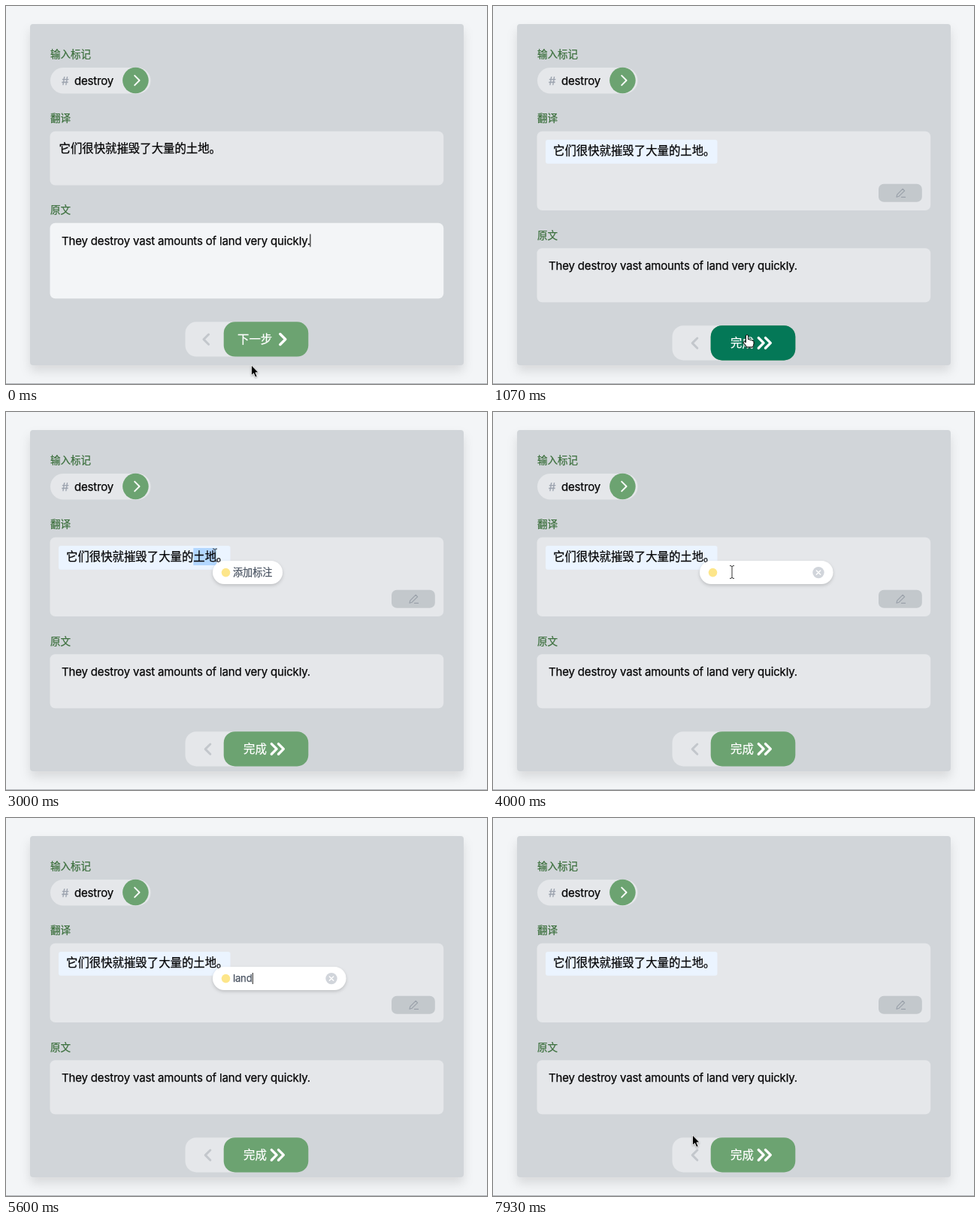
Animation, 640 px wide and 503 px high, one loop 8000 ms. Source, as an HTML page:

```html
<!DOCTYPE html>
<html lang="zh-CN">
<head>
<meta charset="utf-8">
<title>翻译标注</title>
<style>
  html, body { margin: 0; width: 100%; height: 100%; overflow: hidden; background: #f3f5f7; }
  svg { display: block; width: 100%; height: 100%; }
  text {
    font: 15.4px Inter, "Noto Sans CJK SC", sans-serif; white-space: pre;
    color: #050506; fill: currentColor; stroke: currentColor; stroke-width: .25;
  }
  .en { font-size: 15px; letter-spacing: -.17px; }
  .label { font-size: 13.5px; color: #3b6f3c; }
  .white { color: #fff; font-weight: 500; }
  .note { font-size: 13.1px; color: #4b5563; }
  .num { font-size: 11px; color: #8d9096; }
  .on { color: #fff; }
  .box { fill: #e5e7ea; }
  .green { fill: #6ca371; }
  .line { fill: none; stroke: #fff; stroke-linecap: round; stroke-linejoin: round; }
  .back { stroke: #c3c7cc; stroke-width: 3; }
  .next { stroke-width: 3.4; }
  #note { letter-spacing: -.2px; }
  #card { filter: drop-shadow(0 8px 7px rgba(0, 0, 0, .11)); }
  #popup { filter: drop-shadow(0 2px 2px rgba(0, 0, 0, .17)); }
  #ime { filter: drop-shadow(0 3px 4px rgba(0, 0, 0, .25)); }
  #arrow, #hand { filter: drop-shadow(0 1px 1px rgba(0, 0, 0, .3)); }
</style>
</head>
<body>
<svg viewBox="0 0 640 503">
  <rect width="640" height="503" fill="#f3f5f7"/>
  <rect y="502" width="640" height="1" fill="#b4b7bb"/>
  <rect id="card" x="32" y="24" width="577" height="454" rx="4" fill="#d1d5d9"/>

  <text class="label" x="59" y="69">输入标记</text>
  <rect class="box" x="59" y="82" width="133.5" height="34.5" rx="17.2"/>
  <text class="en" x="74" y="104.8" style="color:#9ca3af">#</text>
  <text class="en" x="91" y="104.8">destroy</text>
  <circle class="green" cx="172.4" cy="99" r="17.3"/>
  <path class="line" d="M171.2 92.6l6.4 6.4-6.4 6.4" stroke-width="1.9"/>
  <text class="label" x="59" y="154">翻译</text>

  <g id="buttons">
    <rect class="box" x="238.5" y="420.3" width="80" height="46.3" rx="15"/>
    <rect class="green" x="289.7" y="420.3" width="112.6" height="46.3" rx="15"/>
    <rect id="hover" x="289.7" y="420.3" width="112.6" height="46.3" rx="15" fill="#047857"/>
  </g>

  <g id="writing">
    <rect class="box" x="58.5" y="166.7" width="523.7" height="71.8" rx="7"/>
    <text x="70.5" y="195.2">它们很快就摧毁了大量的土地。</text>
    <text class="label" x="59" y="276">原文</text>
    <rect x="58.5" y="288.8" width="523.7" height="100.5" rx="7" fill="#f3f5f7"/>
    <text class="en" x="74" y="317.6">They destroy vast amounts of land very quickly.</text>
    <rect id="caret" x="404.3" y="303.5" width="1.1" height="17" fill="#111"/>
    <path class="line back" d="M269.6 437l-6.6 6.6 6.6 6.6"/>
    <text class="white" x="308" y="449.4">下一步</text>
    <path class="line next" d="M364.8 436.5l7 7-7 7"/>
  </g>

  <g id="marking">
    <rect class="box" x="58.5" y="166.7" width="523.7" height="105.3" rx="7"/>
    <rect x="70" y="178" width="228.5" height="31.7" rx="3" fill="#ebf4ff"/>
    <rect id="selection" x="249.3" y="181" height="23" fill="#b3d7ff"/>
    <text x="80" y="198.4">它们很快就摧毁了大量的土地。</text>
    <rect x="513" y="236.8" width="57.8" height="24" rx="7" fill="#c3c8cc"/>
    <path class="line" d="M537 254.2l.8-3.4 7.4-7.4 2.4 2.4-7.4 7.4zM543.5 254.4h5" style="stroke:#9aa1aa" stroke-width="1.2"/>
    <text class="label" x="59" y="309.8">原文</text>
    <rect class="box" x="58.5" y="322.3" width="523.7" height="72" rx="7"/>
    <text class="en" x="74" y="351.1">They destroy vast amounts of land very quickly.</text>
    <path class="line back" d="M271.8 442l-6.6 6.6 6.6 6.6"/>
    <text class="white" x="316" y="454.2">完成</text>
    <path class="line next" d="M353.3 441.6l6.8 6.8-6.8 6.8m9.2-13.6l6.8 6.8-6.8 6.8"/>
  </g>

  <g id="popup">
    <rect id="bubble" x="275" y="198" height="31" rx="15.5" fill="#fff"/>
    <circle cx="292.5" cy="213.6" r="5.8" fill="#fde68a"/>
    <text id="prompt" class="note" x="302" y="218.3">添加标注</text>
    <text id="note" class="note" x="302" y="218.2"></text>
    <rect id="underline" x="302" y="220.2" height="1" fill="#4b5563"/>
    <rect id="noteCaret" y="206" width="1.1" height="15" fill="#333"/>
    <g id="clear">
      <circle cx="433" cy="213.6" r="7.7" fill="#d1d5db"/>
      <path class="line" d="M430.3 210.9l5.4 5.4m0-5.4l-5.4 5.4" stroke-width="1.4"/>
    </g>
  </g>

  <g id="ime">
    <rect x="286.3" y="226.7" width="370" height="31.5" rx="6" fill="#1b1d21"/>
    <g id="candidates"></g>
  </g>

  <path id="arrow" d="M0-.6V13L3 10.2 5.3 15.4 7.6 14.4 5.4 9.3H9.5Z" stroke="#fff" stroke-width=".8"/>
  <path id="hand" d="M-1.6 1Q0-1 1.6 1V6.3Q3.2 5.4 4.1 7 5.7 6.1 6.6 7.7 9 7.2 9 9.4V12Q8.6 14 7.5 16.4H-.4Q-2 13.2-5.2 10.4-4.6 8-1.6 10.2Z" fill="#fff" stroke="#000"/>
  <path id="beam" d="M-3-8.5Q0-8.5 0-7 0-8.5 3-8.5M0-7V7M-3 8.5Q0 8.5 0 7 0 8.5 3 8.5" fill="none" stroke="#333"/>
</svg>

<script>
const LOOP = 8000, FPS = 15;
const $ = id => document.getElementById(id);
const set = (id, name, value) => $(id).setAttribute(name, value);
const show = (id, on) => $(id).style.display = on ? '' : 'none';
const clamp = v => Math.max(0, Math.min(1, v));
const during = (k, from, to) => k >= from && k < to;

// Pointer path: [tick, x, y]
const path = [
  [0, 326.5, 478.5], [5, 222, 186], [9, 338, 437.5], [20, 338, 437.5],
  [26, 251, 243.3], [28, 251, 243.3], [34, 249, 191.5], [38, 249, 191.5],
  [43, 278, 190.5], [45, 278, 190.5], [49, 318, 213], [110, 318, 213],
  [111, 308, 227], [113, 308, 227], [119, 265.5, 422.5]
];

// Input method: [tick, typed text, candidates]
const typing = [
  [0, '', ''],
  [73, 'l', '了 来 里 啦 老 两 拉 离 聊'],
  [74, 'la', '啦 拉 辣 喇 蜡 腊 垃 剌 邋'],
  [76, 'lan', '蓝 烂 兰 懒 拦 篮 栏 览 滥'],
  [81, 'lan d', '懒得 烂的 蓝的 蓝调 懒惰 烂掉'],
  [84, 'land', '']
];

function pointerAt(k) {
  const i = path.findIndex(p => p[0] > k);
  if (i < 0) return path[path.length - 1].slice(1);
  const [t0, x0, y0] = path[i - 1], [t1, x1, y1] = path[i];
  const u = (k - t0) / (t1 - t0), e = u * u * (3 - 2 * u);
  return [x0 + (x1 - x0) * e, y0 + (y1 - y0) * e];
}

function pointerShape(k, x, y, marking) {
  const inside = (l, t, r, b) => x > l && x < r && y > t && y < b;
  if (inside(290, marking ? 425 : 420, 402, 470)) return 'hand';
  if (during(k, 46, 103) && inside(275, 198, 452, 229)) return k < 54 ? 'hand' : 'beam';
  const text = marking ? inside(70, 178, 298, 210) : inside(59, 289, 582, 389);
  return text ? 'beam' : 'arrow';
}

function candidateMarkup(list) {
  let x = 292.5;
  return list.split(' ').map((word, i) => {
    const width = 15.4 * word.length, on = i ? '' : ' on';
    const mark = i ? '' : `<rect x="289.7" y="230" width="${width + 17.8}" height="25.3" rx="4" fill="#0a52cc"/>`;
    const item = `${mark}<text class="num${on}" x="${x}" y="246.6">${i + 1}</text>
      <text class="on" x="${x + 9.5}" y="247.8">${word}</text>`;
    x += width + 23.6;
    return item;
  }).join('');
}

function draw(k) {
  const marking = k >= 15;
  show('writing', !marking);
  show('marking', marking);
  set('buttons', 'transform', `translate(0 ${marking ? 4.9 : 0})`);
  set('hover', 'opacity', clamp((k - 9) / 3) - clamp((k - 21) / 4));
  show('caret', Math.floor((k + 3) / 5) % 2 === 0);

  const [x, y] = pointerAt(k);
  const shape = pointerShape(k, x, y, marking);
  for (const id of ['arrow', 'hand', 'beam']) {
    show(id, id === shape && !during(k, 73, 111));
    set(id, 'transform', `translate(${x} ${y})`);
  }

  const chars = Math.min(2, Math.round((x - 249.3) / 15.4));
  set('selection', 'width', during(k, 38, 54) ? Math.max(0, chars) * 15.4 : 0);

  const editing = k >= 54;
  show('popup', during(k, 44, 103));
  set('bubble', 'width', 93 + 84.5 * clamp((k - 53) / 3));
  show('prompt', !editing);
  show('clear', k >= 56);

  const [, typed, list] = typing.filter(s => s[0] <= k).pop();
  $('note').textContent = typed;
  const width = typed && during(k, 73, 103) ? $('note').getComputedTextLength() : 0;
  set('underline', 'width', list ? width : 0);
  set('noteCaret', 'x', 302.3 + width);
  show('noteCaret', editing && !during(k, 60, 65) && !during(k, 70, 73) && !during(k, 90, 95) && k < 99);
  show('ime', list);
  $('candidates').innerHTML = list && candidateMarkup(list);
}

let last = -1;
function frame() {
  const k = Math.floor((performance.now() % LOOP + 4) * FPS / 1000) % (LOOP * FPS / 1000);
  if (k !== last) draw(last = k);
  requestAnimationFrame(frame);
}
frame();
</script>
</body>
</html>
```
